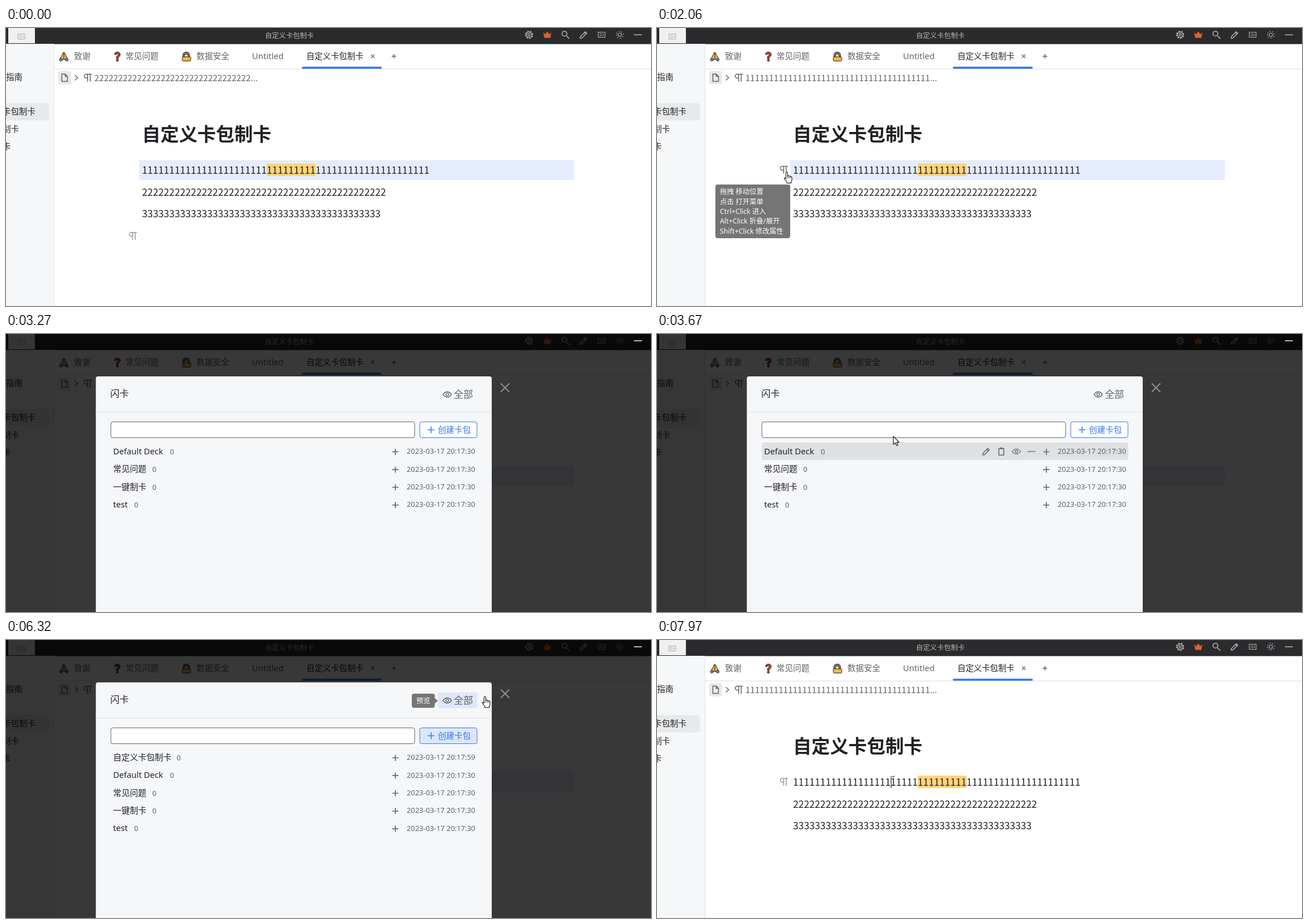
These frames come from a looping animation (1138 by 492 pixels, 8000 ms). An HTML page:

```html
<!DOCTYPE html>
<html lang="zh-CN">
<head>
<meta charset="utf-8">
<title>自定义卡包制卡</title>
<style>
html, body { margin: 0; width: 100%; height: 100%; overflow: hidden; background: #fff; }
svg { display: block; width: 100%; height: 100%; }
text { font-family: "Noto Sans", "Noto Sans CJK SC", sans-serif; white-space: pre; }
.num { font-family: "Noto Sans CJK SC", "Noto Sans", sans-serif; }
</style>
</head>
<body>
<svg id="stage" viewBox="0 0 1138 492"></svg>
<script>
const LOOP = 8000;
const BLUE = '#3575f0', GREY = '#5f6368', INK = '#202124';
const NAME = '自定义卡包制卡';
const PITCH = 31.4;

// Drawing helpers; text is placed by its vertical centre.
const rect = (x, y, w, h, fill, r = 0, extra = '') =>
  `<rect x="${x}" y="${y}" width="${w}" height="${h}" rx="${r}" fill="${fill}" ${extra}/>`;
const text = (s, x, y, size, fill = INK, extra = '') =>
  `<text x="${x}" y="${y + size * 0.367}" font-size="${size}" fill="${fill}" ${extra}>${s}</text>`;
const icon = (d, x, y, color, width = 1.5, extra = '') =>
  `<path d="${d}" transform="translate(${x} ${y})" fill="none" stroke="${color}" stroke-width="${width}" ${extra}/>`;
const group = (id, body) => `<g id="${id}">${body}</g>`;
const circle = r => `M${-r} 0a${r} ${r} 0 1 0 ${2 * r} 0a${r} ${r} 0 1 0 ${-2 * r} 0`;

const D = {
  plus: 'M-6 0H6M0-6V6',
  minus: 'M-7 0H7',
  cross: 'M-3-3L3 3M3-3L-3 3',
  pilcrow: 'M7-6.2H-3A3.3 3.3 0 0 0-3 .6H-.5M-.5-6.2V7M4-6.2V7',
  pencil: 'M-6 6L-5.5 3L3-5.5L5.7-2.8L-3 5.7ZM1.5-4L4.2-1.3',
  trash: 'M-5.5-5H5.5M-2-6.5H2M-4.3-4V6.3H4.3V-4',
  eye: 'M-7.5 0Q0-9.5 7.5 0Q0 9.5-7.5 0Z' + circle(2.4),
  search: 'M2 2L7 7M-6-2a4.3 4.3 0 1 0 8.6 0a4.3 4.3 0 1 0-8.6 0',
  card: 'M-6-4.5H6V4.5H-6ZM-3.5-1.5H1M-3.5 1.5H1M3-2V2',
  page: 'M-5-6.5H1L5-2.5V6.5H-5ZM1-6.5V-2.5H5',
  chevron: 'M-2.5-4.5L2.5 0L-2.5 4.5'
};

function topBar() {
  const c = '#b4b4b4';
  return rect(0, 0, 1138, 28.5, '#2b2b2d') + rect(4, 0, 47, 27, '#f0f0f0') +
    icon(D.card, 27, 15, '#a5a5a5', 1) +
    text(NAME, 457, 13, 12.3, '#b5b5b5') +
    icon(circle(5), 923, 12, c) + icon(circle(6.4), 923, 12, c, 1.8, 'stroke-dasharray="2.3 2.73"') +
    icon(circle(2), 923, 12, c, 1.3) +
    '<path d="M948 8l3.5 3 3.5-5 3.5 5 3.5-3-1.6 9.5h-10.800z" fill="#df632c"/>' +
    icon(D.search, 987, 12, c, 1.6) + icon(D.pencil, 1019, 12, c) + icon(D.card, 1051, 12, c, 1.1) +
    icon(circle(3), 1083, 12, c, 1.2) + icon(circle(6), 1083, 12, c, 1.6, 'stroke-dasharray="1.5 3.21"') +
    icon(D.minus, 1115, 12, c);
}

function sidebar() {
  return rect(0, 28, 84, 464, '#f6f7f9') + rect(84, 28, 1, 464, '#e1e2e4') +
    rect(-10, 133, 86, 30.500, '#e8e9ea', 5) +
    text('指南', 0, 87, 14.5) + text('卡包制卡', -6, 148, 14.5) +
    text('制卡', -6, 179, 14.5) + text('卡', -6, 210, 14.5);
}

function emojis() {
  return '<g stroke="#2a2320" stroke-width="1">' +
    '<path d="M102 43q-2 0-2.500 4l-3.500 6 2 4 4-2 4 2 2-4-3.500-6q-.5-4-2.500-4z" fill="#f5b041"/><path d="M102 44v11"/>' +
    '<path d="M96 53l-2 3.500 2.500 2.500 4-3zM108 53l2 3.500-2.500 2.500-4-3z" fill="#4a90e2"/>' +
    '<path d="M191.500 47q0-4.500 5-4.500t5 4.500q0 3-3.400 5v2h-3.200v-3.500q3-1.500 3-3.500 0-1.500-1.400-1.500t-1.600 1.500z" fill="#c8402c"/>' +
    '<circle cx="196.500" cy="57" r="1.900" fill="#c8402c"/>' +
    '<path d="M312 52v-3q0-6.500 6-6.500t6 6.500v3" fill="#777"/><path d="M315 52v-2.500q0-3.500 3-3.500t3 3.500v2.500" fill="#fff"/>' +
    '<rect x="311" y="51" width="15" height="7.500" rx="2" fill="#f4b63f"/></g>';
}

function tabs() {
  const y = 50, size = 14.5;
  return rect(85, 72, 1053, 1, '#dddee0') + emojis() +
    text('致谢', 120, y, size, GREY) + text('常见问题', 211, y, size, GREY) +
    text('数据安全', 336, y, size, GREY) + text('Untitled', 434, y, 14.8, GREY) +
    text(NAME, 530, y, 14.4) + rect(522, 68.5, 141, 3.500, BLUE, 1.7) +
    icon(D.cross, 647, y, GREY, 1.3) + icon('M-4 0H4M0-4V4', 684.5, y, GREY, 1.4);
}

function breadcrumb() {
  const line = (id, digit, n) =>
    group(id, text(digit.repeat(n) + '...', 156, 88, 15.06, GREY, 'class="num"'));
  return rect(92, 76, 23, 24, '#e8e9ea', 4) + icon(D.page, 103.5, 88, GREY) +
    icon(D.chevron, 124, 88, GREY) + icon(D.pilcrow, 144.500, 88, GREY) +
    line('crumbTwos', '2', 33) + line('crumbOnes', '1', 39);
}

function documentBody() {
  const line = (digit, n, y) => text(digit.repeat(n), 240, y, 17.24, INK, 'class="num"');
  return text(NAME, 240, 188, 32.6, INK, 'font-weight="700"') +
    group('rowGlow', rect(235, 234, 767, 35, '#e4ecfd')) +
    rect(460, 240, 86.500, 22, '#ffd37a') +
    line('1', 53, 251.5) + line('2', 45, 291) + line('3', 44, 329) +
    group('gutter', icon(D.pilcrow, 0, 0, 'currentColor', 1.6)) +
    group('textCaret', rect(412.5, 241, 1.2, 21, INK));
}

function gutterTip() {
  const lines = ['拖拽 移动位置', '点击 打开菜单', 'Ctrl+Click 进入', 'Alt+Click 折叠/展开', 'Shift+Click 修改属性'];
  return group('gutterTip', rect(103, 277, 132, 95, '#757575', 4) +
    lines.map((s, i) => text(s, 111, 290 + i * 17.3, 12.25, '#fff', 'font-weight="500"')).join(''));
}

function menus() {
  const items = ['转换为', '复制', '剪切', '移动到', '删除', '属性', '外观', '书签', '命名', '别名', '备注', '快速制卡', '闪卡', '超级块'];
  const panel = (x, y, w, h) => rect(x, y, w, h, '#fff', 5, 'stroke="#dcdde0"');
  const main = items.map((s, i) => text(s, 36, 52 + i * 32, 14, INK)).join('');
  const sub = ['快速制卡', '取消制卡', '添加到卡包'].map((s, i) => text(s, 250, 400 + i * 32, 14, INK)).join('');
  return group('menu', panel(0.500, 28, 216, 463.5) + main) +
    group('submenu', rect(6, 421, 205, 30, '#e8e9ea', 4) + text('闪卡', 36, 436, 14) +
      panel(217, 380, 188, 104) + rect(223, 449, 176, 30, '#e8e9ea', 4) + sub);
}

function deck(name, countX, second, y) {
  return text(name, 189, y, 14.7) + text('0', countX, y + 0.5, 13, GREY) +
    icon('M-5.500 0H5.500M0-5.500V5.500', 687, y + 1, GREY, 1.6) +
    text('2023-03-17 20:17:' + second, 707, y, 12.8, GREY);
}

function dialog() {
  const decks = [['Default Deck', 289], ['常见问题', 258], ['一键制卡', 258], ['test', 226]];
  const top = 207.5;
  return group('dialog', rect(0, 0, 1138, 492, '#000', 0, 'opacity=".78"') +
    icon(D.minus, 1115, 12, '#ddd', 1.6) +
    icon('M-7.500-7.500L7.500 7.500M7.500-7.500L-7.500 7.500', 880.5, 95, '#919191', 2) +
    rect(158.5, 75, 698.500, 430, '#f6f7f9', 4) + rect(158.5, 138, 698.500, 1, '#e2e3e5') +
    text('闪卡', 184, 105.5, 16.3) +
    group('previewHover', rect(762, 93, 69.500, 28, '#dfe8f9', 4)) +
    icon(D.eye, 778.5, 107, GREY, 1.3) + text('全部', 790, 107, 17, GREY) +
    group('previewTip', rect(716, 95, 40.500, 25, '#757575', 4) +
      '<path d="M756 102.500l6 5-6 5z" fill="#757575"/>' + text('预览', 724, 107.5, 12.3, '#fff', 'font-weight="500"')) +
    group('focusRing', rect(183, 153.500, 540, 32, 'none', 5, 'stroke="#cfddfb" stroke-width="3"')) +
    rect(185, 155.500, 536, 28, '#fff', 3.5, 'id="field"') +
    group('fieldText', text(NAME, 193, 169.5, 14.4)) + group('fieldCaret', rect(292, 159, 1, 20, INK)) +
    rect(730, 155.500, 101, 28, '#fff', 3.5, `id="create" stroke="${BLUE}"`) +
    icon(D.plus, 750, 169.5, BLUE) + text('创建卡包', 762, 169.5, 14.5, BLUE) +
    group('hover', rect(185, 192, 646.500, 31, '#dfe0e2', 4) +
      icon(D.pencil, 580.5, 208, GREY) + icon(D.trash, 607.5, 208, GREY) +
      icon(D.eye, 634, 208, GREY, 1.2) + icon(D.minus, 660.5, 208, GREY, 1.3)) +
    group('newDeck', deck(NAME, 301, 59, top)) +
    group('decks', decks.map(([name, x], i) => deck(name, x, 30, top + i * PITCH)).join('')));
}

function cursors() {
  const edge = 'fill="#fff" stroke="#111" stroke-width="1.1" stroke-linejoin="round"';
  return group('pointer',
    group('arrow', `<path d="M0 0V14.500L3.400 11.500L5.700 16.500L8 15.500L5.800 10.600H10.300Z" ${edge}/>`) +
    group('hand', `<path d="M-1.500 12V1.500Q-1.500 0 0 0T1.500 1.500V7Q3.500 5.600 4.300 7.300Q6.200 6.500 6.700 8.200Q9 7.700 9 10V14Q9 16 7.500 17.500V19.500H0V17.500L-4.500 11.500Q-4.500 9.500-2.800 10.400Z" ${edge}/><path d="M1.500 7V11M4.200 7.500V11M6.700 8.500V11" stroke="#111" stroke-width=".8"/>`) +
    group('beam', icon('M-3-8H-1L0-7L1-8H3M0-7V7M-3 8H-1L0 7L1 8H3', 0, 0, '#555', 1)));
}

const stage = document.getElementById('stage');
stage.innerHTML = rect(0, 0, 1138, 492, '#fff') + topBar() + sidebar() + tabs() + breadcrumb() +
  documentBody() + gutterTip() + menus() + dialog() + cursors();
const el = {};
for (const node of stage.querySelectorAll('[id]')) el[node.id] = node;

// The screen refreshes in bursts: start, end, number of steps.
const bursts = [[250, 930, 11], [1130, 1130, 1], [1280, 1920, 10], [2060, 2660, 9], [3200, 3790, 9],
  [4120, 4840, 11], [5050, 5050, 1], [5240, 5310, 2], [5450, 5510, 2], [5980, 6720, 11],
  [6790, 6980, 3], [7120, 7770, 11], [7970, 7970, 1]];
const ticks = [0];
for (const [a, b, n] of bursts)
  for (let i = 0; i < n; i++) ticks.push(Math.floor((a + (b - a) * i / Math.max(1, n - 1)) / 10) * 10);

// Pointer stops: time, x, y, shape used until the next stop.
const route = [
  [250, 958, 451, 'beam'], [590, 600, 196, 'beam'], [930, 328, 252, 'beam'], [1280, 328, 252, 'beam'],
  [1770, 229, 255, 'hand'], [2200, 229, 255, 'hand'], [2420, 150, 434, 'hand'], [2660, 300, 462, 'hand'],
  [3200, 300, 462, 'none'], [3340, 400, 300, 'arrow'], [3640, 417, 181, 'arrow'], [3710, 420, 170, 'beam'],
  [4260, 420, 170, 'beam'], [4330, 440, 176, 'arrow'], [4550, 610, 200, 'arrow'], [4760, 768, 178, 'hand'],
  [5980, 768, 178, 'hand'], [6120, 790, 106, 'hand'], [6270, 845, 100, 'hand'], [6490, 893, 86, 'hand'],
  [6720, 889, 87, 'hand'], [6980, 887, 88, 'hand'], [7120, 887, 88, 'arrow'], [7310, 760, 150, 'beam'],
  [7770, 417, 286, 'beam'], [7960, 417, 286, 'beam'], [7970, 417, 249, 'beam']
];

function pointerAt(t) {
  const i = route.findLastIndex(stop => stop[0] <= t);
  if (i < 0) return { x: 0, y: 0, shape: 'none' };
  const a = route[i], b = route[i + 1] || a;
  const k = b === a ? 0 : (t - a[0]) / (b[0] - a[0]);
  const ease = k * k * (3 - 2 * k);
  return { x: a[1] + (b[1] - a[1]) * ease, y: a[2] + (b[2] - a[2]) * ease, shape: a[3] };
}

const show = (id, on) => el[id].setAttribute('visibility', on ? 'inherit' : 'hidden');
const move = (id, x, y) => el[id].setAttribute('transform', `translate(${x} ${y})`);

function draw(time) {
  const t = ticks.findLast(tick => tick <= time);
  const during = (a, b) => t >= a && t < b;
  const p = pointerAt(t);

  show('crumbTwos', t < 1350);
  show('crumbOnes', t >= 1350);
  show('rowGlow', !during(1350, 1770) && t < 7970);
  show('textCaret', t >= 7970);
  move('gutter', 224, t < 1130 ? 368 : 251);
  el.gutter.setAttribute('color', during(1770, 7120) ? '#6d6d6d' : '#9a9a9a');
  show('gutterTip', during(1920, 2200));
  show('menu', during(2200, 3200));
  show('submenu', during(2500, 3200));

  const open = during(3200, 7190);
  const focused = during(4120, 5240);
  const added = t >= 5450;
  show('dialog', open);
  el.dialog.setAttribute('opacity', t < 3270 || t >= 7120 ? 0.5 : 1);
  show('focusRing', focused);
  el.field.setAttribute('stroke', focused ? BLUE : GREY);
  show('fieldText', during(4260, 5450));
  show('fieldCaret', during(4540, 5050));
  el.create.setAttribute('fill', during(4760, 6980) ? '#dde7fb' : '#fff');
  show('hover', during(3340, 3710));
  move('hover', 0, PITCH * Math.max(0, Math.round((p.y - 207.5) / PITCH)));
  show('newDeck', added);
  move('decks', 0, added ? PITCH : 0);
  show('previewHover', during(6120, 6490));
  show('previewTip', during(6200, 6490));

  move('pointer', p.x, p.y);
  for (const shape of ['arrow', 'hand', 'beam']) show(shape, p.shape === shape);
}

const start = performance.now();
function loop(now) {
  draw(Math.max(0, now - start) % LOOP);
  requestAnimationFrame(loop);
}
loop(start);
</script>
</body>
</html>
```
